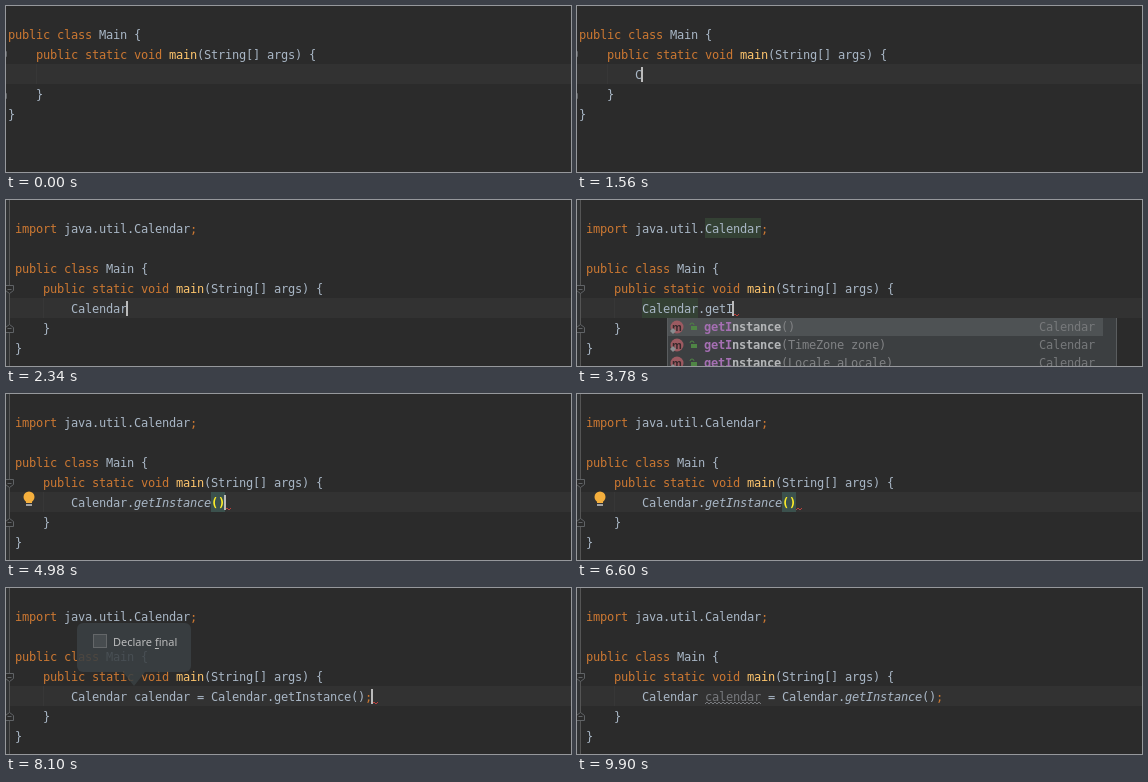
Recreate the animation shown at these times as an HTML page with a canvas. Size 565 by 166 pixels, loop 9.96 s.

```html
<!DOCTYPE html>
<html lang="en">
<head>
<meta charset="utf-8">
<title>Code completion</title>
<style>
  html, body { margin: 0; width: 100%; height: 100%; overflow: hidden; background: #2b2b2b; }
  canvas { display: block; }
</style>
</head>
<body>
<canvas id="stage" width="565" height="166"></canvas>
<script>
const ctx = document.getElementById('stage').getContext('2d');
const LOOP = 9960, CELL = 7, LINE = 20, WIDTH = 565, HEIGHT = 166;
const MONO = '12px "DejaVu Sans Mono", monospace';
const TEXT = '#a9b7c6', KEYWORD = '#cc7832', METHOD = '#ffc66d', MATCH = '#a56fb3';
const POPUP = '#3c3f41', SELECTED = '#4e5254', EDGE = '#5a5d5f', USAGE = '#344134';
const KEYWORDS = ['import', 'public', 'class', 'static', 'void', ';'];

const within = (t, from, to) => t >= from && t < to;
const passed = (t, times) => times.filter(time => t >= time).length;

function rect(x, y, w, h, color) {
  ctx.fillStyle = color;
  ctx.fillRect(x, y, w, h);
}

function path(points, color, close) {
  ctx.beginPath();
  points.forEach(([x, y]) => ctx.lineTo(x, y));
  if (close) {
    ctx.fillStyle = color;
    ctx.fill();
  } else {
    ctx.strokeStyle = color;
    ctx.lineWidth = 1;
    ctx.stroke();
  }
}

function disc(x, y, r, color) {
  ctx.beginPath();
  ctx.arc(x, y, r, 0, Math.PI * 2);
  ctx.fillStyle = color;
  ctx.fill();
}

// Writes on the editor's fixed character grid and returns the next x.
function write(text, x, baseline, color = TEXT, style = '') {
  ctx.font = `${style} ${MONO}`;
  ctx.fillStyle = color;
  for (const char of text) {
    ctx.fillText(char, x, baseline);
    x += CELL;
  }
  return x;
}

function label(text, x, baseline, color, font = '11px "Noto Sans", sans-serif') {
  ctx.font = font;
  ctx.fillStyle = color;
  ctx.fillText(text, x, baseline);
}

function code(line, x, top, look = {}) {
  for (const token of line.match(/\w+|\s+|./g) || []) {
    const color = KEYWORDS.includes(token) ? KEYWORD : token === 'main' ? METHOD : TEXT;
    const [tint, style] = look[token] || [color, ''];
    x = write(token, x, top + 15, tint, style);
  }
}

function squiggle(x, y, width, color) {
  const points = [];
  for (let i = 0; i <= width; i += 2) points.push([x + i, y + (i % 4 ? 0 : 2)]);
  path(points, color);
}

function foldMark(x, y, down) {
  const d = down ? 1 : -1;
  const shape = [[x - 4, y - 4 * d], [x + 4, y - 4 * d], [x + 4, y + d], [x, y + 4 * d], [x - 4, y + d], [x - 4, y - 4 * d]];
  path(shape, '#2b2b2b', true);
  path(shape, '#606366');
  path([[x - 2, y], [x + 2, y]], '#606366');
}

function bulb(x, y) {
  disc(x, y, 5.5, '#f4af3d');
  rect(x - 3, y + 3, 6, 3, '#f4af3d');
  rect(x - 3, y + 7, 6, 2, '#a0a0a0');
}

function padlock(x, y) {
  rect(x - 3, y, 6, 4, '#4f8545');
  ctx.beginPath();
  ctx.arc(x - 2, y - 1, 2, Math.PI, Math.PI * 2);
  ctx.strokeStyle = '#4f8545';
  ctx.lineWidth = 1;
  ctx.stroke();
}

function symbolIcon(kind, x, y) {
  disc(x, y, 6.5, kind === 'm' ? '#9c5a61' : '#4f8797');
  label(kind, x - (kind === 'm' ? 5 : 3.5), y + 3.5, '#35292b', 'bold 10px "Open Sans", sans-serif');
  if (kind === 'm') path([[x - 7, y + 4], [x - 4, y + 1], [x - 1, y + 4], [x - 4, y + 7]], '#8a8d90', true);
}

function completion(x, top, right, kind, rows, matched) {
  rect(x, top, right - x, HEIGHT - top, POPUP);
  rows.forEach(([name, tail, type = ''], i) => {
    const y = top + i * 18, baseline = y + 13;
    if (i === 0) rect(x, y, right - x - 14, 18, SELECTED);
    symbolIcon(kind, x + 10, y + 9);
    padlock(x + 27, y + 8);
    let next = write(name.slice(0, matched), x + 37, baseline, MATCH, 'bold');
    next = write(name.slice(matched), next, baseline, '#b4b6b8', 'bold');
    write(tail, next, baseline, '#808284');
    write(type, right - 22 - type.length * CELL, baseline, '#77797b');
  });
  rect(x, top, 1, HEIGHT - top, EDGE);
  rect(right - 1, top, 1, HEIGHT - top, EDGE);
}

function namePopup(selected) {
  rect(118, 118, 167, 48, POPUP);
  ['instance', 'calendar', 'calendarInstance'].forEach((name, i) => {
    if (i === selected) rect(118, 118 + i * 18, 167, 18, SELECTED);
    write(name, 128, 131 + i * 18, '#b4b6b8');
  });
}

function intentionPopup() {
  rect(219, 118, 187, 23, EDGE);
  rect(220, 119, 185, 21, '#4b6eaf');
  bulb(231, 128);
  label('Introduce local variable', 246, 134, '#dddddd', '12px "Noto Sans", sans-serif');
  path([[395, 125], [400, 129.5], [395, 134]], '#dddddd', true);
}

function finalBalloon(alpha) {
  ctx.globalAlpha = alpha;
  ctx.beginPath();
  ctx.roundRect(71, 35, 114, 49, 6);
  ctx.fillStyle = '#3a4043';
  ctx.fill();
  path([[117, 84], [139, 84], [128, 98]], '#3a4043', true);
  rect(87, 46, 14, 14, '#6b6e70');
  rect(88, 47, 12, 12, '#43494b');
  label('Declare final', 107, 58, '#cfcfcf');
  rect(107 + ctx.measureText('Declare ').width, 60, 4, 1, '#cfcfcf');
  ctx.globalAlpha = 1;
}

const classRows = [
  ['Calendar', ' (java.util)'],
  ['CalendarDataProvider', ' (sun.util.spi)'],
  ['CalendarNameProvider', ' (java.util.spi)'],
  ['CalendarDataUtility', ' (sun.util.locale.provider)'],
  ['CalendarUtils', ' (sun.util.calendar)'],
];
const instanceRows = [
  ['getInstance', '()', 'Calendar'],
  ['getInstance', '(TimeZone zone)', 'Calendar'],
  ['getInstance', '(Locale aLocale)', 'Calendar'],
];
const getterRows = [
  ['getAvailableCalendarTypes', '()', 'Set<String>'],
  ['getAvailableLocales', '()', 'Locale[]'],
  instanceRows[0],
];

const classKeys = [1500, 1680, 1740, 1800, 1920, 1980, 2040, 2100];
const memberKeys = [3180, 3240, 3420, 3780];

function statement(t) {
  if (t < 2340) return 'Calendar'.slice(0, passed(t, classKeys));
  if (t < 2760) return 'Calendar';
  if (t < 4140) return 'Calendar.' + 'getI'.slice(0, passed(t, memberKeys));
  if (t < 6660) return 'Calendar.getInstance()';
  return `Calendar ${t < 7620 ? 'instance' : 'calendar'} = Calendar.getInstance();`;
}

function balloonAlpha(t) {
  if (t < 8100) return passed(t, [6720, 6780, 6840]) / 3;
  return t < 8280 ? 0.87 - 0.28 * passed(t, [8160, 8220]) : 0;
}

function drawEditor(t) {
  const imported = t >= 2340;
  const left = imported ? 9 : 2, classTop = imported ? 58 : 18;
  const top = classTop + 2 * LINE, indent = left + 8 * CELL;
  const renaming = within(t, 6660, 8100);
  const text = statement(t);

  rect(0, 0, WIDTH, HEIGHT, '#2b2b2b');
  rect(0, top, WIDTH, LINE, '#323232');
  rect(left + 4 * CELL, top, 1, LINE, '#373737');
  if (imported) rect(0, 0, 3, HEIGHT, '#313335');
  rect(left - 6, 0, 1, HEIGHT, imported ? '#555555' : '#2b2b2b');
  foldMark(left - 5.5, classTop + 31.5, true);
  foldMark(left - 5.5, classTop + 70.5, false);

  if (within(t, 2640, 4440)) {
    rect(128, 18, 56, LINE, USAGE);
    rect(indent, top, 56, LINE, USAGE);
  }
  if (imported) code('import java.util.Calendar;', left, 18);
  code('public class Main {', left, classTop);
  code('    public static void main(String[] args) {', left, classTop + LINE);
  code('    }', left, classTop + 3 * LINE);
  code('}', left, classTop + 4 * LINE);

  const look = {};
  if (within(t, 4500, 6660) || t >= 8400) look.getInstance = [TEXT, 'italic'];
  if (within(t, 4140, 6660)) {
    rect(205, top, 14, LINE, '#3b514d');
    look['('] = look[')'] = ['#ffef28', 'bold'];
  }
  if (t >= 8400) {
    look.calendar = ['#77797d', ''];
    squiggle(128, 114, 56, '#77797d');
  }
  if (renaming) {
    if (t < 7140) rect(128, 101, 56, 15, '#214283');
    ctx.strokeStyle = '#8a8d90';
    ctx.lineWidth = 1;
    ctx.strokeRect(127.5, 100.5, 57, 16);
  }
  code(text, indent, top, look);

  const end = indent + text.length * CELL;
  if (within(t, 2760, 6660) || within(t, 8100, 8400)) squiggle(end, 114, 6, '#bc3f3c');
  if (within(t, 4980, 6660)) bulb(23, 103);

  const caretHidden = t < 540 || t >= 9900 ||
    [[1500, 1560], [5340, 5820], [6600, 6660], [9060, 9540]].some(([a, b]) => within(t, a, b));
  if (!caretHidden) rect((renaming ? 184 : end) - 1, top + 3, 2, 15, '#bbbbbb');
}

function drawPopups(t) {
  if (within(t, 1680, 2340)) completion(20, 78, 522, 'C', classRows, passed(t, classKeys));
  if (within(t, 2940, 4140)) {
    completion(90, 118, 540, 'm', t < 3780 ? getterRows : instanceRows, passed(t, memberKeys));
  }
  if (within(t, 5940, 6600)) intentionPopup();
  if (within(t, 6660, 8100)) namePopup(passed(t, [7140, 7620]) - 1);
  const alpha = balloonAlpha(t);
  if (alpha > 0) finalBalloon(alpha);
}

const start = performance.now();
function frame() {
  const t = (performance.now() - start) % LOOP;
  drawEditor(t);
  drawPopups(t);
  requestAnimationFrame(frame);
}
frame();
</script>
</body>
</html>
```
